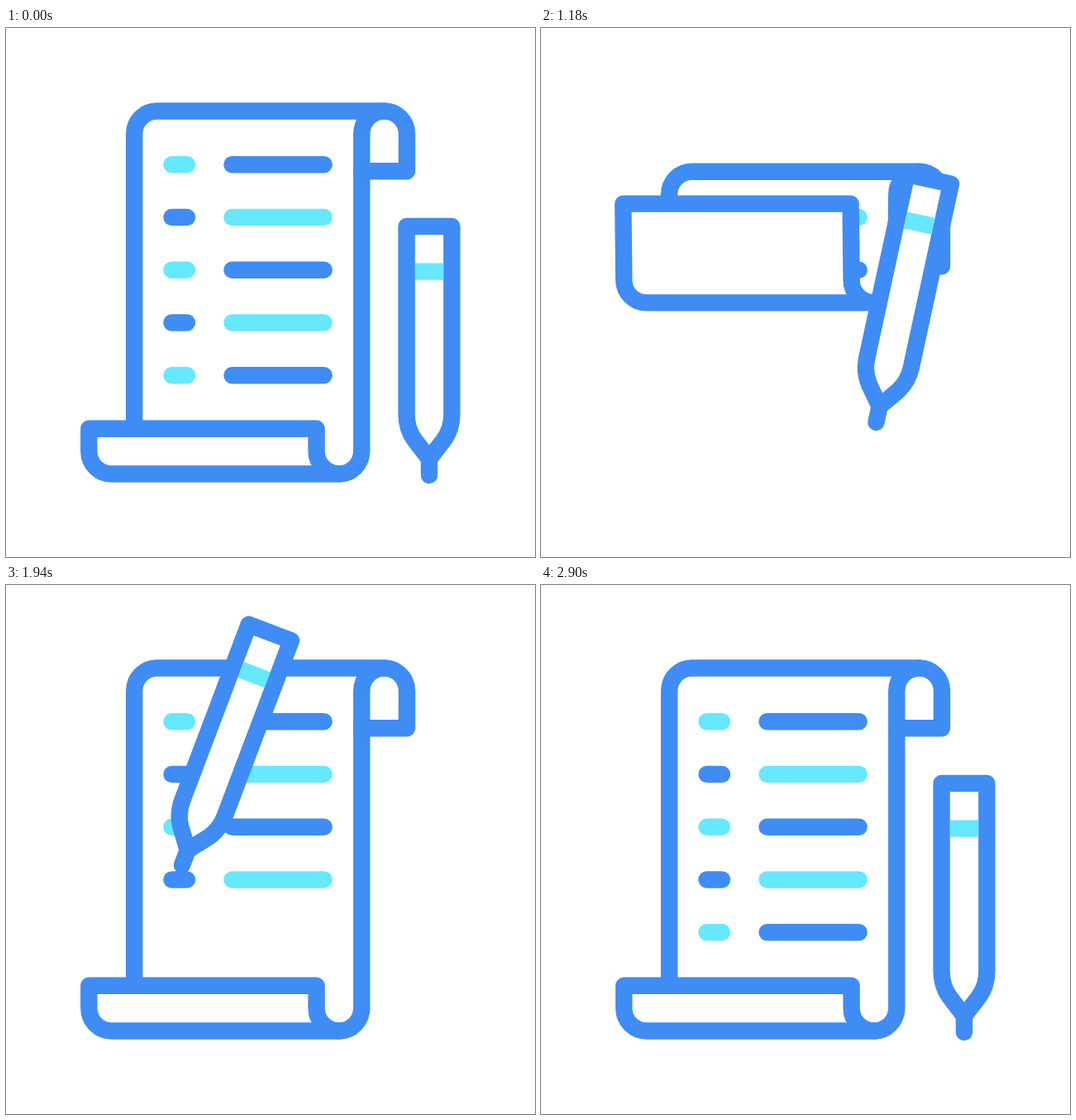
An HTML page for the animation above (3000 ms loop, 640x640 px).

```html
<!DOCTYPE html>
<html lang="en">
<head>
<meta charset="utf-8">
<title>Writing a list</title>
<style>
  html, body { margin: 0; width: 100%; height: 100%; overflow: hidden; background: #fff; }
  svg { display: block; width: 100vw; height: 100vh; }
  path, line { fill: none; stroke: #3f8cf4; stroke-width: 20.4; stroke-linecap: round; stroke-linejoin: round; }
  .cyan { stroke: #66e8ff; }
  .white { fill: #fff; }
</style>
</head>
<body>
<svg viewBox="0 0 640 640">
  <clipPath id="sheet"><path id="inside"/></clipPath>
  <path id="back"/>
  <g id="rows" clip-path="url(#sheet)"></g>
  <path id="body"/>
  <path id="flap" class="white"/>
  <g id="pen">
    <path class="white" d="M0 131L18 107.5Q27.4 94 27.4 77V-150.4H-27.4V77Q-27.4 94 -18 107.5Z"/>
    <path class="cyan" style="stroke-linecap:butt" d="M-17.2 -95.8H17.2"/>
    <path d="M0 131V150.6"/>
  </g>
</svg>
<script>
const LOOP = 3000;
const $ = id => document.getElementById(id);
const clamp = x => Math.min(1, Math.max(0, x));
const span = (t, from, to) => clamp((t - from) / (to - from));
const ease = x => x < .5 ? 8 * x ** 4 : 1 - .5 * (2 - 2 * x) ** 3.5;

// Pen centre and tilt: leave, swing over the sheet, lift, write, return
const rest = { x: 512, y: 390.4, tilt: 0 };
const poses = [
  { t: 960, ...rest },
  { t: 1180, x: 437.7, y: 330, tilt: 12.2 },
  { t: 1600, x: 290.8, y: 263.3, tilt: 16.7 },
  { t: 1860, x: 253, y: 190, tilt: 18.5 },
  { t: 2260, x: 357.4, y: 280.3, tilt: 29.3 },
  { t: 2700, x: 455, y: 364, tilt: 13.5 },
  { t: 2900, ...rest }
];

function slope(i, k) {
  const a = poses[i - 1], b = poses[i + 1];
  return a && b ? (b[k] - a[k]) / (b.t - a.t) : 0;
}

// Smooth curve through the poses
function penAt(t) {
  const i = poses.findIndex(p => p.t > t) - 1;
  if (i < 0) return [rest.x, rest.y, rest.tilt];
  const a = poses[i], b = poses[i + 1], h = b.t - a.t, u = (t - a.t) / h, v = 1 - u;
  return ["x", "y", "tilt"].map(k =>
    v * v * (1 + 2 * u) * a[k] + u * u * (3 - 2 * u) * b[k] +
    h * u * v * (v * slope(i, k) - u * slope(i + 1, k)));
}

function addLine(x1, x2, y, cyan) {
  const line = document.createElementNS("http://www.w3.org/2000/svg", "line");
  for (const [k, v] of Object.entries({ x1, x2, y1: y, y2: y })) line.setAttribute(k, v);
  if (cyan) line.setAttribute("class", "cyan");
  $("rows").append(line);
  return { line, x1, x2 };
}

let dash, rule;
for (let i = 0; i < 5; i++) {
  const y = 165.2 + 63.75 * i;
  dash = addLine(200.5, 219, y, i % 2 === 0);
  rule = addLine(273.5, 384.7, y, i % 2 === 1);
}

function write({ line, x1, x2 }, part) {
  line.setAttribute("x2", x1 + (x2 - x1) * part);
  line.style.display = part > 0 ? "" : "none";
}

function drawPaper(p) {
  const top = 100.5 + 74.5 * p, bottom = 539.5 - 210.5 * p;
  const lip = 484.7 - 276.5 * p, tail = 173.2 + 117 * p;
  const high = top + 27.4, low = bottom - 27.4;
  const arc = (sweep, x, y) => `A27.4 27.4 0 0 ${sweep} ${x} ${y}`;
  const body = `M${155.2 - p} ${lip}L155.2 ${high}${arc(1, 182.6, top)}H457.7` +
    `${arc(0, 430.3, high)}L${430.3 - p} ${low}${arc(1, 403 - p, bottom)}`;
  $("body").setAttribute("d", body);
  $("inside").setAttribute("d", body + "H155Z");
  $("back").setAttribute("d", `M457.7 ${top}${arc(1, 485, high)}V${tail}H430.3`);
  $("flap").setAttribute("d", `M${403 - p} ${bottom}${arc(1, 375.6, low)}L${375.6 - p} ${lip}` +
    `H${100.3 - p}L100.3 ${low}${arc(0, 127.7, bottom)}Z`);
}

function frame() {
  const t = performance.now() % LOOP;
  drawPaper(ease(span(t, 0, 990)) - ease(span(t, 990, 1891)));
  write(dash, t < 1000 ? 1 : span(t, 2100, 2200));
  write(rule, t < 1000 ? 1 : span(t, 2200, 2800));
  const [x, y, tilt] = penAt(t);
  $("pen").setAttribute("transform", `translate(${x} ${y}) rotate(${tilt})`);
  requestAnimationFrame(frame);
}
frame();
</script>
</body>
</html>
```
